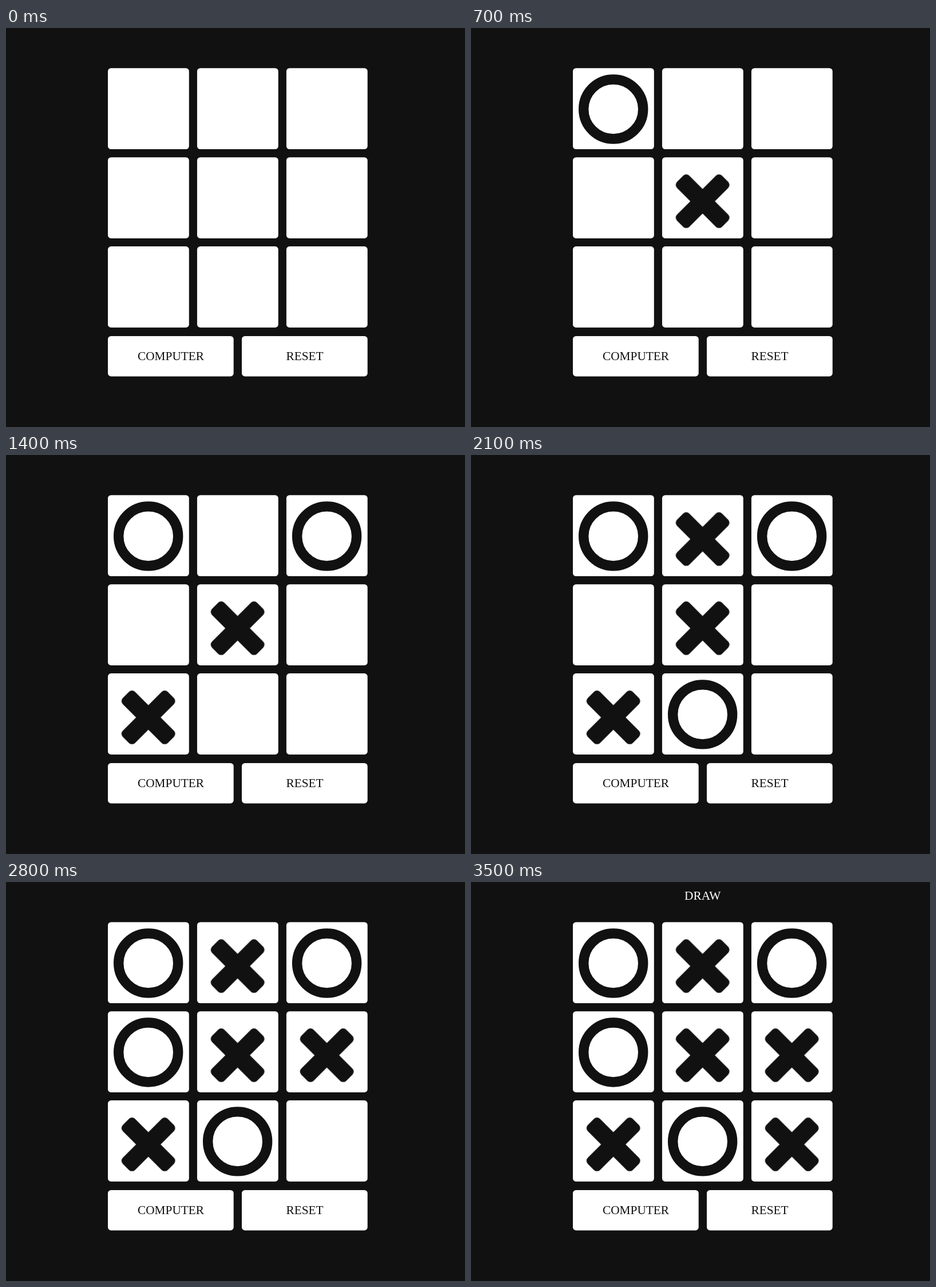
Animation, 802 px wide and 698 px high, one loop 4.2 s. Source, as an HTML page:

```html
<!DOCTYPE html>
<html lang="en">
<head>
<meta charset="utf-8">
<title>Tic-tac-toe</title>
<style>
  html, body { margin: 0; width: 100%; height: 100%; overflow: hidden; background: #111; }
  svg { display: block; }
  .tile { fill: #fff; }
  .ring { fill: none; stroke: #111; stroke-width: 17.4; }
  .cross, text { fill: #111; }
  text { font: 21.3px "Liberation Serif", "Times New Roman", serif; text-anchor: middle; }
  .result { fill: #fff; }
</style>
</head>
<body>
<svg id="stage" width="802" height="698" viewBox="0 0 802 698"></svg>
<script>
const STEP = 700, STEPS = 6;
const LEFT = 178, TOP = 70.2, PITCH = 155.95, SIZE = 141.8;
const stage = document.getElementById("stage");

// [step, mark, column, row]
const moves = [
  [1, "O", 0, 0], [1, "X", 1, 1],
  [2, "O", 2, 0], [2, "X", 0, 2],
  [3, "X", 1, 0], [3, "O", 1, 2],
  [4, "O", 0, 1], [4, "X", 2, 1],
  [5, "X", 2, 2]
];

function add(tag, attrs, text = "") {
  const el = document.createElementNS("http://www.w3.org/2000/svg", tag);
  for (const key in attrs) el.setAttribute(key, attrs[key]);
  el.textContent = text;
  stage.append(el);
  return el;
}

function tile(x, y, width, height) {
  add("rect", { class: "tile", x, y, width, height, rx: 5.5 });
}

function label(text, x, y, cls = "") {
  return add("text", { x, y, class: cls }, text);
}

// One arm with rounded corners, turned four times around the centre.
function crossPath() {
  const arm = [[294, 294], [28, 28, 28, 68], [0, 40, -28, 68], [-136, 136],
               [-28, 28, -68, 28], [-40, 0, -68, -28], [-294, -294]];
  const turn = ([x, y], n) => n ? turn([-y, x], n - 1) : [x, y];
  let d = "M272 0";
  for (let n = 0; n < 4; n++) {
    for (const p of arm) {
      d += (p.length > 2 ? "q" : "l") + turn(p.slice(0, 2), n).join(" ");
      if (p.length > 2) d += " " + turn(p.slice(2), n).join(" ");
    }
  }
  return d + "z";
}

function mark(kind, col, row) {
  const x = 248.7 + col * PITCH, y = 142 + row * PITCH;
  return kind === "O"
    ? add("circle", { class: "ring", cx: x, cy: y, r: 52 })
    : add("path", { class: "cross", d: crossPath(),
        transform: `translate(${x} ${y + 5.1}) scale(.079)` });
}

function showFrom(el, step) {
  const offset = step / STEPS;
  el.animate([
    { opacity: 0, offset: 0 }, { opacity: 0, offset },
    { opacity: 1, offset }, { opacity: 1, offset: 1 }
  ], { duration: STEP * STEPS, iterations: Infinity }).startTime = 0;
}

for (let i = 0; i < 9; i++)
  tile(LEFT + i % 3 * PITCH, TOP + Math.floor(i / 3) * PITCH, SIZE, SIZE);
tile(LEFT, 539, 219.7, 70.4);
tile(412, 539, 219.7, 70.4);
label("COMPUTER", 288, 581);
label("RESET", 522, 581);

for (const [step, kind, col, row] of moves) showFrom(mark(kind, col, row), step);
showFrom(label("DRAW", 404.8, 31, "result"), 5);
</script>
</body>
</html>
```
